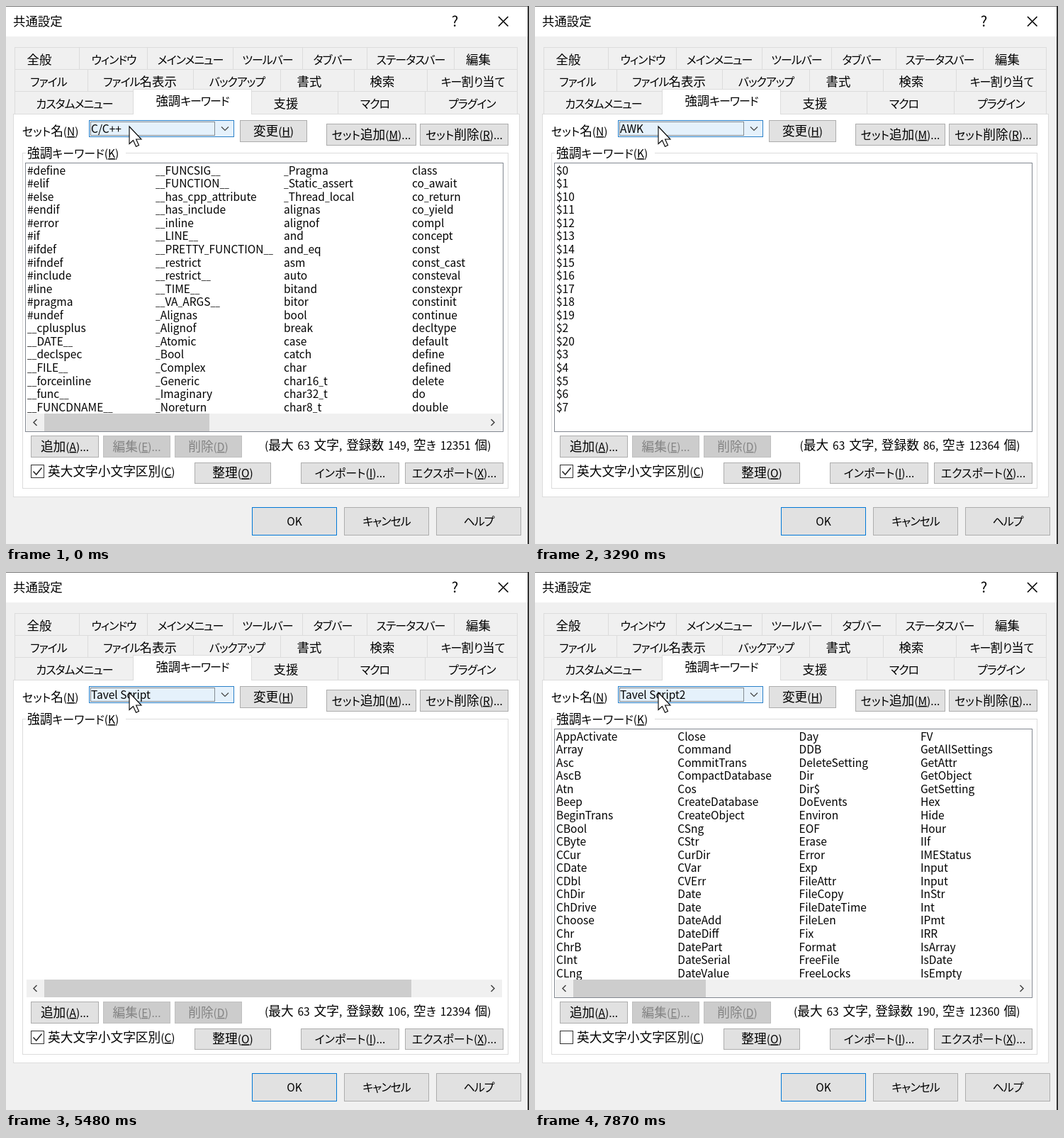
Write an HTML page that moves like this. It is 738x759 px and loops after 8 s.

```html
<!DOCTYPE html>
<html lang="ja">
<head>
<meta charset="utf-8">
<title>共通設定</title>
<style>
html, body { margin: 0; width: 100%; height: 100%; overflow: hidden; background: #f0f0f0; }
svg { display: block; }
text { font: 15.5px "Noto Sans CJK JP", "Noto Sans CJK", sans-serif; fill: #000; white-space: pre; }
.kana { font-size: 16px; font-feature-settings: "palt"; }
.kanji { font-size: 17.7px; }
.ui .kana { letter-spacing: -1px; }
.ui .kanji { font-size: 17.4px; }
.low { font-size: 12px; }
.key { text-decoration: underline; }
.off { fill: #838383; }
.mid { text-anchor: middle; }
.end { text-anchor: end; word-spacing: 2.4px; }
rect { shape-rendering: crispEdges; }
</style>
</head>
<body>
<svg width="738" height="759" viewBox="0 0 738 759">
  <clipPath id="listClip"><rect x="28" y="222" width="673" height="378"/></clipPath>
  <g id="dialog"></g>
  <g id="state"></g>
  <path d="M174 170V194.5L179.5 189.5L183.5 198.3L187.5 196.5L183.6 188H191Z" fill="#fff" stroke="#000" stroke-width="1.1"/>
</svg>
<script>
const LOOP = 8000, ROWS = 19, PITCH = 18.55, LIST_WIDTH = 673, TRACK = 622;

const box = (x1, y1, x2, y2, fill, stroke = 'none') =>
  `<rect x="${x1 + .5}" y="${y1 + .5}" width="${x2 - x1 - 1}" height="${y2 - y1 - 1}" fill="${fill}" stroke="${stroke}"/>`;
const fillBox = (x1, y1, x2, y2, fill) =>
  `<rect x="${x1}" y="${y1}" width="${x2 - x1}" height="${y2 - y1}" fill="${fill}"/>`;
const line = (d, stroke, w = 1) =>
  `<path d="${d}" fill="none" stroke="${stroke}" stroke-width="${w}"/>`;
const rich = s => s
  .replace(/_+/g, m => `<tspan class="low">${m}</tspan>`)
  .replace(/[ぁ-んァ-ヶー]+/g, m => `<tspan class="kana">${m}</tspan>`)
  .replace(/[一-龠]+/g, m => `<tspan class="kanji">${m}</tspan>`)
  .replace(/\(([A-Z])\)/g, '(<tspan class="key">$1</tspan>)');
const text = (x, y, s, cls = '') => `<text x="${x}" y="${y}" class="${cls}">${rich(s)}</text>`;

function button(x1, y1, x2, y2, label, kind = '', border = '#adadad') {
  const [fill, stroke] = kind === 'off' ? ['#cccccc', '#bfbfbf'] : ['#e1e1e1', border];
  return box(x1, y1, x2, y2, fill, stroke)
    + text((x1 + x2) / 2, (y1 + y2) / 2 + 6.3, label, 'mid ' + kind);
}

function tabRow(y, edges, labels) {
  const cells = edges.slice(1).map((x, i) => box(edges[i], y, x + 1, y + 33, '#f0f0f0', '#dcdcdc'));
  return cells.join('') + labels.map(([x, s]) => text(x, y + 23.5, s, 'mid ui')).join('');
}

function dialog() {
  return fillBox(0, 0, 738, 759, '#f0f0f0') + fillBox(0, 0, 738, 43, '#fff')
    + fillBox(0, 0, 738, 1, '#777') + fillBox(736, 0, 738, 759, '#333')
    + text(10, 28, '共通設定', 'ui')
    + '<text x="633.5" y="29" class="mid" style="font-size:20px;font-weight:500">?</text>'
    + line('M695 15L708.5 28.5M708.5 15L695 28.5', '#000', 1.6)
    + tabRow(58, [12, 103, 199, 320, 418, 509, 632, 721],
        [[47, '全般'], [152, 'ウィンドウ'], [260, 'メインメニュー'], [369, 'ツールバー'], [461, 'タブバー'], [571, 'ステータスバー'], [666.5, '編集']])
    + tabRow(89, [12, 115, 264, 387, 491, 594, 721],
        [[60, 'ファイル'], [189, 'ファイル名表示'], [326, 'バックアップ'], [428, '書式'], [531, '検索'], [658.5, 'キー割り当て']])
    + tabRow(120, [12, 179, 346, 468, 591, 721],
        [[96.5, 'カスタムメニュー'], [395, '支援'], [520.5, 'マクロ'], [657.5, 'プラグイン']])
    + box(10, 152, 725, 693, '#fff', '#dcdcdc')
    + box(179, 117, 347, 160, '#fff', '#dcdcdc') + fillBox(178, 153, 348, 161, '#fff')
    + text(263, 140, '強調キーワード', 'mid ui')
    + text(23, 183, 'セット名(N)')
    + box(117, 161, 322, 185, '#e5f1fb', '#2a80c8') + box(119, 163, 295, 183, 'none', '#858c93')
    + line('M304 170.5L309 175.5L314 170.5', '#444', 1.2)
    + button(330, 161, 425, 192, '変更(H)')
    + button(452, 166, 579, 197, 'セット追加(M)...')
    + button(584, 166, 709, 197, 'セット削除(R)...')
    + box(23, 207, 709, 681, 'none', '#dcdcdc') + fillBox(28, 200, 169, 218, '#fff')
    + text(30, 214, '強調キーワード(K)')
    + button(35, 606, 131, 637, '追加(A)...')
    + button(137, 606, 232, 637, '編集(E)...', 'off')
    + button(238, 606, 333, 637, '削除(D)', 'off')
    + box(35, 647, 54, 666, '#fff', '#333')
    + text(59, 663, '英大文字小文字区別(C)')
    + button(266, 644, 374, 674, '整理(O)')
    + button(416, 644, 555, 674, 'インポート(I)...')
    + button(563, 644, 702, 674, 'エクスポート(X)...')
    + button(347, 707, 467, 747, 'OK', 'ui', '#0078d7')
    + button(477, 707, 597, 747, 'キャンセル', 'ui')
    + button(607, 707, 727, 747, 'ヘルプ', 'ui');
}

const split = s => s.trim().split(/\s+/);
const range = (a, b) => Array.from({ length: b - a + 1 }, (_, i) => '$' + (a + i));

const cWords = split(`#define #elif #else #endif #error #if #ifdef #ifndef #include #line #pragma #undef
  __cplusplus __DATE__ __declspec __FILE__ __forceinline __func__ __FUNCDNAME__
  __FUNCSIG__ __FUNCTION__ __has_cpp_attribute __has_include __inline __LINE__ __PRETTY_FUNCTION__ __restrict
  __restrict__ __TIME__ __VA_ARGS__ _Alignas _Alignof _Atomic _Bool _Complex _Generic _Imaginary _Noreturn
  _Pragma _Static_assert _Thread_local alignas alignof and and_eq asm auto bitand bitor bool break case catch
  char char16_t char32_t char8_t class co_await co_return co_yield compl concept const const_cast consteval
  constexpr constinit continue decltype default define defined delete do double`);

const mathWords = split(`AA aa acute addcontentsline addtocounter addtolength AE ae aleph Alph alph alpha and
  angle appendix approx arabic arccos arctan arg arrayrulewidth arraystretch ast atop author b backslash bar
  baselineskip baselinestretch begin beta bf bibitem bibliography bibliographystyle Big big bigcap bigcirc
  bigcup Bigg bigg biggl Biggl biggm Biggm Biggr biggr Bigl bigl Bigm bigm bigodot bigoplus bigotimes Bigr
  bigr bigskip bigtriangledown bigtriangleup boldmath bot Box brace breve bullet bye c cal cap caption cc
  cdot cdots centering chapter check chi choose circ circle cite clearpage cline closing clubsuit colon
  columnsep columnseprule cong cot coth cr cup`).map(w => '¥' + w);

const awkWords = [...range(0, 1), ...range(10, 19), '$2', '$20', ...range(3, 9), ...split(`ARGC ARGIND ARGV
  atan2 BEGIN break close continue CONVFMT cos delete do else END ENVIRON ERRNO exit exp fflush FIELDWIDTHS
  FILENAME FNR for FS func function gensub getline gsub if IGNORECASE in index int length log match next NF
  NR OFMT OFS ORS print printf rand return RLENGTH RS RSTART RT sin split sprintf sqrt srand strftime sub
  SUBSEP substr system systime tolower toupper while`)];

const scriptWords = split(`and as assert async await break class continue def del elif else except False
  finally for from global if import in is lambda None nonlocal not or pass raise return self True try while
  with yield`);

const formWords = split(`AppActivate Array Asc AscB Atn Beep BeginTrans CBool CByte CCur CDate CDbl ChDir
  ChDrive Choose Chr ChrB CInt CLng Close Command CommitTrans CompactDatabase Cos CreateDatabase CreateObject
  CSng CStr CurDir CVar CVErr Date Date DateAdd DateDiff DatePart DateSerial DateValue Day DDB DeleteSetting
  Dir Dir$ DoEvents Environ EOF Erase Error Exp FileAttr FileCopy FileDateTime FileLen Fix Format FreeFile
  FreeLocks FV GetAllSettings GetAttr GetObject GetSetting Hex Hide Hour IIf IMEStatus Input Input InStr Int
  IPmt IRR IsArray IsDate IsEmpty`);

const common = split(`abs access all and any append array as assign base begin bind block boolean break by
  byte call case catch char class close const continue copy date declare default delete dim do double each
  else elseif end enum error event exit export false file final float for from function get global goto if
  implements import in input integer is let like local long loop mod module move new next not null object of
  on open option or output print private public read record ref repeat return select set static step stop
  string sub switch then this to true type until using value void while with write xor`);
const take = (n, shift = 0) => Array.from({ length: n }, (_, i) => common[(i + shift) % common.length]);
const upper = list => list.map(w => w.toUpperCase());
const title = list => list.map(w => w[0].toUpperCase() + w.slice(1));

// start, settled, first paint, name, entries, free, case sensitive, words, column width
const sets = [
  [0, 0, '', 'C/C++', 149, 12351, true, cWords, 181],
  [1440, 1510, 'blank', 'HTML', 212, 12288, false, take(95, 4), 134],
  [1870, 1920, 'blank', 'SQL', 174, 12326, false, upper(take(95)), 140],
  [2260, 2310, 'blank', 'COBOL', 80, 12370, true, upper(take(80, 6)), 131],
  [2600, 2620, 'blank', 'Ada', 63, 12437, true, take(63), 112],
  [2960, 2960, '', 'sh', 42, 12458, true, take(42, 20), 104],
  [3290, 3320, 'column', 'AWK', 86, 12364, true, awkWords, 131],
  [3580, 3600, 'column', 'Fortran', 74, 12426, false, take(74, 8), 126],
  [3890, 3890, '', 'INI', 38, 12462, false, take(38, 30), 110],
  [4220, 4300, 'column', 'Zyl', 493, 12357, true, mathWords, 152.8],
  [4510, 4540, 'blank', 'Scheme', 128, 12372, true, take(95, 2), 136],
  [4830, 4860, 'blank', 'Prolog', 117, 12383, true, take(95, 10), 130],
  [5140, 5160, 'blank', 'ECMA', 121, 12379, true, take(95), 132],
  [5480, 5520, 'blank', 'Tavel Script', 106, 12394, false, title(take(106)), 122],
  [5810, 5840, 'blank', 'Batch', 135, 12365, false, take(95, 5), 140],
  [6120, 6140, 'blank', 'XML', 54, 12446, true, take(54, 12), 116],
  [6380, 6380, '', 'Mervon', 36, 12364, true, scriptWords, 118.7],
  [7440, 7470, 'column', 'Text', 47, 12453, true, take(47, 24), 110],
  [7800, 7870, 'column', 'Tavel Script2', 190, 12360, false, formWords, 171.3],
];

function scrollbar(count, width) {
  const columns = Math.ceil(count / ROWS), visible = Math.floor(LIST_WIDTH / width);
  if (columns * width <= LIST_WIDTH) return '';
  return fillBox(29, 575, 700, 600, '#f0f0f0')
    + fillBox(54, 575, 54 + Math.round(TRACK * visible / columns), 600, '#cdcdcd')
    + line('M43.5 583L39 587.5L43.5 592M684.5 583L689 587.5L684.5 592', '#444', 1.5);
}

function paint(index, phase) {
  const [, , , name, count, free, checked, words, width] = sets[index];
  // The checkbox keeps its previous value until the list has settled.
  const sensitive = phase ? sets[index - 1][6] : checked;
  const shown = phase === 'blank' ? [] : phase === 'column' ? words.slice(0, ROWS) : words;
  const items = shown.map((word, i) =>
    text(30 + Math.floor(i / ROWS) * width, 237.7 + i % ROWS * PITCH, word)).join('');
  return text(120, 179, name)
    + (phase === 'blank' ? '' : box(27, 221, 702, 601, '#fff', '#828790'))
    + `<g clip-path="url(#listClip)">${items}</g>` + scrollbar(count, width)
    + text(684.5, 625.5, `(最大 63 文字, 登録数 ${count}, 空き ${free} 個)`, 'end')
    + (sensitive ? line('M38.5 656.5L42.7 661L50.5 651.5', '#222', 1.5) : '');
}

function phaseAt(t, [start, settled, first]) {
  if (t >= settled) return '';
  const long = settled - start >= 50;
  return long && t >= start + 20 ? 'column' : first;
}

const stateLayer = document.getElementById('state');
document.getElementById('dialog').innerHTML = dialog();
let drawn = '';
function frame() {
  const t = performance.now() % LOOP;
  const index = sets.findLastIndex(set => set[0] <= t);
  const phase = phaseAt(t, sets[index]);
  const key = index + phase;
  if (key !== drawn) {
    stateLayer.innerHTML = paint(index, phase);
    drawn = key;
  }
  requestAnimationFrame(frame);
}
frame();
</script>
</body>
</html>
```
